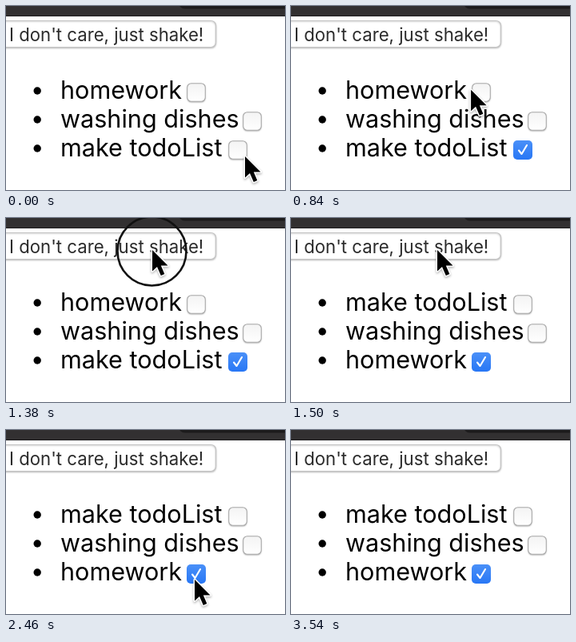
These frames come from a looping animation (349x230 px, 3600 ms). An HTML page with a canvas:

```html
<!DOCTYPE html>
<html lang="en">
<head>
<meta charset="utf-8">
<title>Shuffled to-do list</title>
<style>
  html, body { margin: 0; width: 100%; height: 100%; overflow: hidden; background: #fff; }
  canvas { display: block; }
</style>
</head>
<body>
<canvas id="stage" width="349" height="230"></canvas>
<script>
const ctx = document.getElementById('stage').getContext('2d');
const LOOP = 3600, STEP = 60;
const ROW = 36, LEFT = 68;
const CHECK = 420, SWAP = 1500, PRESS = 300;

// Label and the left edge of its checkbox
const items = { homework: 226, 'washing dishes': 296, 'make todoList': 278 };
const before = Object.keys(items);
const after = [...before].reverse();

// Each move starts where the last one ended; via bends it, power eases it out
const home = [299, 187];
const moves = [
  { start: 0, end: 120, to: [292.5, 183] },
  { start: 600, end: 1320, to: [183, 39], via: [232, 123], power: 2.2 },
  { start: 1740, end: 2160, to: [244, 187], via: [196, 111], power: 1.3 },
  { start: 2160, end: 2340, to: [236, 186] },
  { start: 2760, end: 3000, to: [204, 238] }
];

function pointerAt(t) {
  let pos = home;
  for (const { start, end, to, via, power = 1 } of moves) {
    if (t <= start) break;
    const u = Math.min(1, (t - start) / (end - start));
    const s = 1 - (1 - u) ** power;
    pos = pos.map((a, i) => {
      const mid = via ? via[i] : (a + to[i]) / 2;
      return (1 - s) ** 2 * a + 2 * s * (1 - s) * mid + s * s * to[i];
    });
  }
  return pos;
}

function box(x, y, w, h, r, fill, line) {
  ctx.beginPath();
  ctx.roundRect(x, y, w, h, r);
  ctx.fillStyle = fill;
  ctx.fill();
  if (line) stroke(line, 1.2);
}

function stroke(color, width) {
  ctx.strokeStyle = color;
  ctx.lineWidth = width;
  ctx.lineCap = ctx.lineJoin = 'round';
  ctx.stroke();
}

function text(str, x, y, size, color) {
  ctx.font = `${size}px Inter, "Open Sans", sans-serif`;
  ctx.fillStyle = color;
  ctx.fillText(str, x, y);
}

function polyline(...points) {
  ctx.beginPath();
  points.forEach(([x, y]) => ctx.lineTo(x, y));
}

function fade(y, h, top, bottom) {
  const g = ctx.createLinearGradient(0, y, 0, y + h);
  g.addColorStop(0, top);
  g.addColorStop(1, bottom);
  return g;
}

function withShadow(alpha, blur, dy, paint) {
  ctx.save();
  ctx.shadowColor = `rgba(0,0,0,${alpha})`;
  ctx.shadowBlur = blur;
  ctx.shadowOffsetY = dy;
  paint();
  ctx.restore();
}

function drawChrome() {
  ctx.fillStyle = '#fff';
  ctx.fillRect(0, 0, 349, 230);
  ctx.fillStyle = '#323031';
  ctx.fillRect(0, 0, 349, 13);
  box(216, -12, 160, 15.5, 8, '#1c1b1c');
  ctx.fillStyle = '#1e1d1e';
  ctx.fillRect(0, 12, 349, 1);

  withShadow(.22, 2, 1, () => box(-20, 18.5, 282.5, 33, 6, '#fff', '#c4c4c4'));
  text("I don't care, just shake!", 4, 44, 22.2, '#2b2b2b');
}

function checkbox(x, y, checked) {
  if (!checked) {
    withShadow(.2, 1.5, 1, () => box(x + .8, y + .8, 22.4, 22.4, 5, '#fff', '#aaa'));
    box(x + 1.5, y + 1.5, 21, 21, 4.5, fade(y, 24, '#f3f3f3', '#fff'));
    return;
  }
  box(x, y, 24, 24, 5, fade(y, 24, '#4a90f8', '#2877f5'));
  polyline([x + 7, y + 12.5], [x + 10.5, y + 17], [x + 17, y + 6]);
  stroke('#fff', 2.1);
}

function drawList(list, done) {
  list.forEach((label, i) => {
    const y = i * ROW;
    ctx.beginPath();
    ctx.arc(39.2, 106 + y, 4.7, 0, Math.PI * 2);
    ctx.fillStyle = '#000';
    ctx.fill();
    text(label, LEFT, 116 + y, 30.6, '#000');
    checkbox(items[label], 96 + y, done && i === 2);
  });
}

function drawArrow() {
  polyline([0, 1], [0, 27.5], [6, 22], [10.8, 33], [15.3, 31], [10.8, 20.4], [19.5, 20.4]);
  ctx.closePath();
  withShadow(.3, 3, 1.5, () => stroke('#fff', 3));
  ctx.fillStyle = '#000';
  ctx.fill();
}

function drawBeam() {
  ctx.beginPath();
  for (const s of [-1, 1]) {
    ctx.moveTo(-6, 14 * s);
    ctx.quadraticCurveTo(0, 14 * s, 0, 10 * s);
    ctx.quadraticCurveTo(0, 14 * s, 6, 14 * s);
  }
  ctx.moveTo(0, -11);
  ctx.lineTo(0, 11);
  stroke('#fff', 4.5);
  stroke('#000', 2);
}

function drawRing() {
  ctx.beginPath();
  ctx.arc(-.5, 2.5, 43, 0, Math.PI * 2);
  stroke('#111', 2.6);
}

function overText(list, x, y) {
  const label = list[Math.floor((y - 88) / ROW)];
  return label !== undefined && x > LEFT && x < items[label] - 6;
}

function draw(t) {
  const list = t < SWAP ? before : after;
  const tip = pointerAt(t);
  const pressed = [CHECK, SWAP].some(up => t >= up - PRESS && t < up);
  drawChrome();
  drawList(list, t >= CHECK);
  ctx.save();
  ctx.translate(...tip);
  if (pressed) drawRing();
  if (overText(list, ...tip)) drawBeam();
  else drawArrow();
  ctx.restore();
}

const start = performance.now();
function tick() {
  const t = (performance.now() - start) % LOOP;
  draw(Math.floor(t / STEP) * STEP);
  requestAnimationFrame(tick);
}
tick();
</script>
</body>
</html>
```
